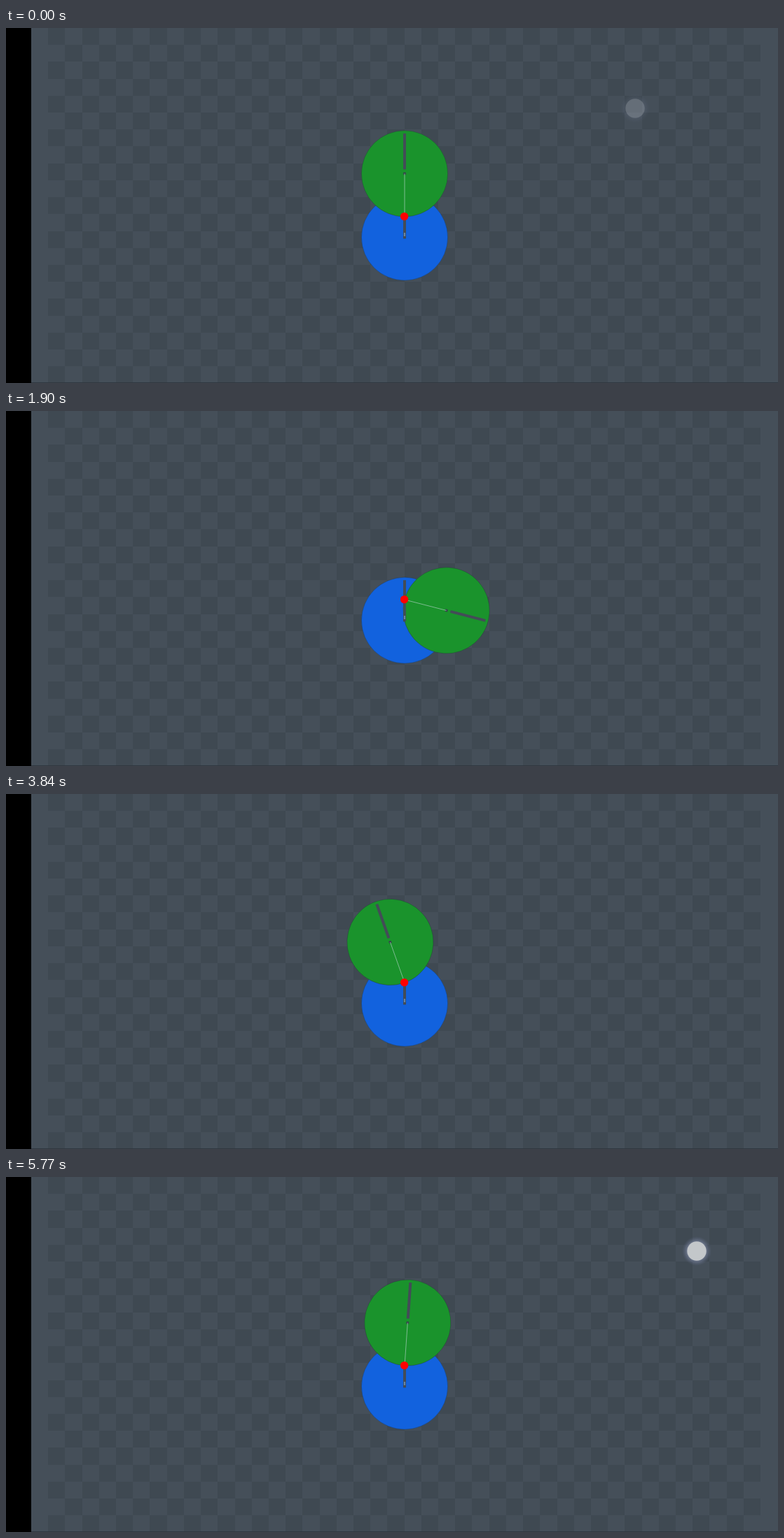
Write an HTML page with a canvas that moves like this. It is 1102 by 508 pixels and loops after 5810 ms.

```html
<!DOCTYPE html>
<html lang="en">
<head>
<meta charset="utf-8">
<title>Hinged discs</title>
<style>
  html, body { margin: 0; width: 100%; height: 100%; overflow: hidden; background: #000; }
  canvas { display: block; }
</style>
</head>
<body>
<canvas id="stage" width="1102" height="508"></canvas>
<script>
const LOOP = 5810;
const ctx = document.getElementById('stage').getContext('2d');
const pivot = { x: 569, y: 270 };
const RADIUS = 61.6;

// [time in ms, swing in degrees clockwise from upright]
const swing = [
  [740, 0], [860, 14], [1000, 41], [1140, 68], [1280, 90.5], [1360, 100],
  [1640, 118], [1940, 101], [2430, 45.5], [2560, 30], [2850, 4.5],
  [3090, -10.5], [3220, -15.5], [3540, -20.7], [3840, -19.5], [4140, -13],
  [4410, -7], [4660, -3.2], [5030, 1.5], [5400, 3.4], [5770, 4], [5810, 4]
];

const clamp01 = v => Math.max(0, Math.min(1, v));
const ramp = (t, start, end) => clamp01((t - start) / (end - start));

function slope(i) {
  if (i === 0 || i === swing.length - 1) return 0;
  const [before, after] = [swing[i - 1], swing[i + 1]];
  return (after[1] - before[1]) / (after[0] - before[0]);
}

function swingAngle(t) {
  if (t <= swing[0][0]) return 0;
  const next = swing.findIndex(point => point[0] > t);
  const [t0, a] = swing[next - 1], [t1, b] = swing[next];
  const span = t1 - t0, u = (t - t0) / span, v = 1 - u;
  const degrees = a * (1 + 2 * u) * v * v + b * u * u * (3 - 2 * u)
    + span * u * v * (v * slope(next - 1) - u * slope(next));
  return degrees * Math.PI / 180;
}

function circle(x, y, r, fill) {
  ctx.beginPath();
  ctx.arc(x, y, r, 0, Math.PI * 2);
  ctx.fillStyle = fill;
  ctx.fill();
}

function line(x1, y1, x2, y2, width, color) {
  ctx.beginPath();
  ctx.moveTo(x1, y1);
  ctx.lineTo(x2, y2);
  ctx.lineWidth = width;
  ctx.strokeStyle = color;
  ctx.stroke();
}

function drawBackground() {
  const cell = 24.21, left = 36;
  ctx.fillStyle = '#000';
  ctx.fillRect(0, 0, 1102, 508);
  ctx.fillStyle = '#454f59';
  ctx.fillRect(left, 0, 1066, 508);
  ctx.fillStyle = '#3f4952';
  for (let row = 0; row < 21; row++) {
    for (let col = 1; col < 43; col++) {
      if ((row + col) % 2 === 0) continue;
      const x = Math.round(left + col * cell), y = Math.round(row * cell);
      ctx.fillRect(x, y, Math.round(left + (col + 1) * cell) - x,
        Math.round((row + 1) * cell) - y);
    }
  }
  ctx.fillStyle = '#303840';
  ctx.fillRect(left, 507, 1066, 1);
}

function drawWheel(x, y, angle, fill) {
  ctx.save();
  ctx.translate(x, y);
  ctx.rotate(angle);
  circle(0, 0, RADIUS, fill);
  ctx.lineWidth = 0.8;
  ctx.strokeStyle = 'rgba(40,55,60,.5)';
  ctx.stroke();
  line(0, -6, 0, -57.5, 4, '#434c57');
  ctx.fillStyle = '#354149';
  ctx.fillRect(-1.8, -1.8, 3.6, 3.6);
  ctx.restore();
}

function drawHand(t) {
  const alpha = 0.65 * ramp(t, 730, 780) * (1 - ramp(t, 1120, 1345));
  if (!alpha) return;
  const travel = ramp(t, 740, 1150);
  ctx.save();
  ctx.translate(648 - 70 * (1 - travel), 212 - 30 * (1 - travel));
  ctx.globalAlpha = alpha;
  const shade = ctx.createLinearGradient(0, 0, 30, 74);
  shade.addColorStop(0, '#a9bda9');
  shade.addColorStop(1, '#7f9182');
  ctx.fillStyle = shade;
  // Index finger, folded fingers, wrist, then thumb
  ctx.fill(new Path2D(`M-3 2 Q-1 -3 2 2 L10 24 Q15 19 19 25
    Q25 21 29 28 Q36 27 38 35 L40 54 L35 66 L36 74 L9 74 L9 66
    L-4 51 L-17 26 Q-18 21 -12 25 L0 35 L4 32 Z`));
  ctx.lineWidth = 1;
  ctx.strokeStyle = '#5f7263';
  ctx.stroke(new Path2D('M10 24 L14 42 M19 25 L23 44 M29 28 L31 45 M9 66 L35 66'));
  ctx.restore();
}

function drawTouch(x, y, alpha) {
  if (!alpha) return;
  ctx.save();
  ctx.globalAlpha = alpha;
  const glow = ctx.createRadialGradient(x, y, 13, x, y, 21);
  glow.addColorStop(0, 'rgba(150,160,190,.55)');
  glow.addColorStop(1, 'rgba(100,110,150,0)');
  circle(x, y, 21, glow);
  circle(x, y, 13.7, '#c3c7ca');
  ctx.restore();
}

function draw(t) {
  const angle = swingAngle(t);
  const x = pivot.x + RADIUS * Math.sin(angle);
  const y = pivot.y - RADIUS * Math.cos(angle);

  drawBackground();
  drawWheel(569, 299.6, 0, '#1262de');
  drawWheel(x, y, angle, '#1a932c');
  line(569, 270, 569, 301, 3.6, '#434c57');
  line(569, 293, 569, 298, 1.6, '#7596b8');
  line(pivot.x, pivot.y, x, y, 1, '#7cbc90');
  circle(568.6, 269.6, 5.7, '#f00');

  drawHand(t);
  drawTouch(898, 115, 0.23 * (1 - ramp(t, 20, 150)));
  drawTouch(986, 106, ramp(t, 5580, 5740));
}

function frame() {
  draw(performance.now() % LOOP);
  requestAnimationFrame(frame);
}
frame();
</script>
</body>
</html>
```
